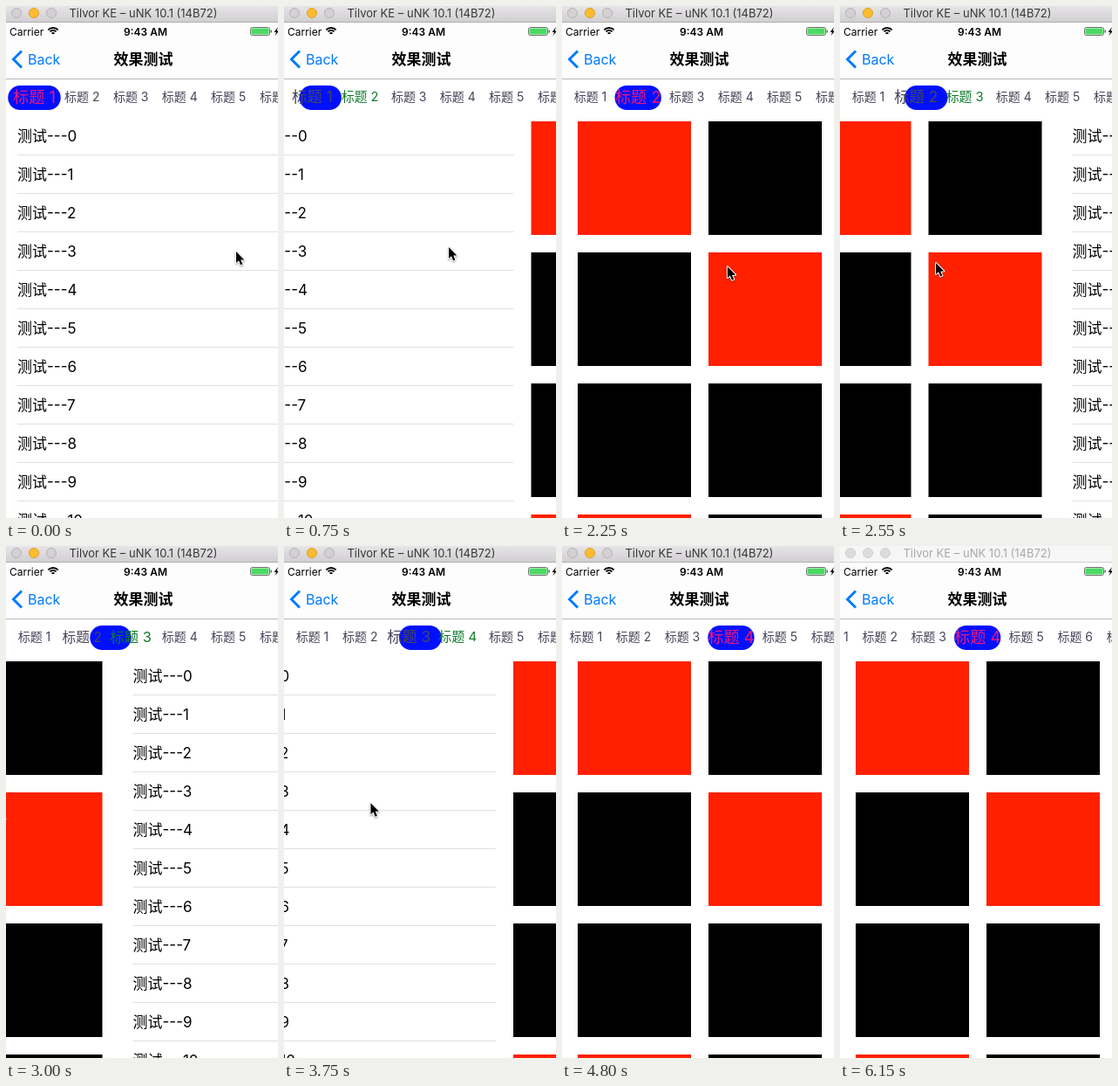
Write an HTML page with a canvas that moves like this. It is 312x586 px and loops after 6.25 s.

```html
<!DOCTYPE html>
<html lang="zh">
<head>
<meta charset="utf-8">
<style>
  html, body { margin: 0; width: 100%; height: 100%; overflow: hidden; background: #fff; }
  canvas { display: block; }
</style>
</head>
<body>
<canvas id="stage" width="312" height="586"></canvas>
<script>
const ctx = document.getElementById('stage').getContext('2d');
const LOOP = 6250, STEP = 150, PAGE = 320;
const SWIPE = 1190, LAG = 80; // page travel time, and delay behind the pointer
const FAMILY = 'Inter, "Noto Sans CJK SC", "Noto Sans CJK", sans-serif';
const RED = '#ff2000', BLUE = '#0010ff', TINT = '#007aff';
const GREY = '#46465a', GREEN = '#0f7a2c', PINK = '#e8187c';

// Pointer position at the moment each drag begins
const swipes = [
  { at: 468, x: 264, y: 281 },
  { at: 2223, x: 197, y: 299 },
  { at: 3391, x: 195, y: 299 }
];
const leave = { at: 5230, x: 60, y: 76 };

const clamp = v => Math.min(1, Math.max(0, v));
const smooth = u => u * u * (3 - 2 * u);

const scrollAt = t => swipes.reduce((sum, s) => sum + clamp((t - s.at - LAG) / SWIPE), 0);
const tabShift = t => 41.5 * smooth(clamp((t - 4700) / 450));

// The pointer comes in fast from the left, then drags back out
function pointerAt(t) {
  const time = Math.max(t, swipes[0].at);
  const spots = [...swipes, leave].map(s => {
    const dt = time - s.at;
    return { x: s.x + (dt < 0 ? dt : -.266 * dt), y: s.y - 5 * Math.sin(dt / 190) };
  });
  return spots.reduce((a, b) => b.x > a.x ? b : a);
}

function rect(x, y, w, h, color) {
  ctx.fillStyle = color;
  ctx.fillRect(x, y, w, h);
}

function text(str, x, y, size, color = '#000', align = 'left', weight = 400) {
  ctx.font = `${weight} ${size}px ${FAMILY}`;
  ctx.textAlign = align;
  ctx.fillStyle = color;
  ctx.fillText(str, x, y);
}

function pill(x, y, w, h, r) {
  ctx.beginPath();
  ctx.roundRect(x, y, w, h, r);
}

function fill(color) {
  ctx.fillStyle = color;
  ctx.fill();
}

function stroke(color, width) {
  ctx.strokeStyle = color;
  ctx.lineWidth = width;
  ctx.stroke();
}

function polygon(...points) {
  ctx.beginPath();
  points.forEach(([x, y]) => ctx.lineTo(x, y));
}

function list(x) {
  for (let i = 0; i < 11; i++) {
    text('测试---' + i, x + 15, 155 + 44 * i, 17);
    rect(x + 15, 170 + 44 * i, PAGE - 15, 1, '#e0e0e3');
  }
}

function grid(x) {
  for (let i = 0; i < 8; i++) {
    rect(x + 20 + 150 * (i % 2), 132 + 150 * (i >> 1), 130, 130, i % 3 ? '#000' : RED);
  }
}

function pages(pos) {
  for (let i = 0; i < 4; i++) {
    const x = -2 + Math.round((i - pos) * PAGE * 2) / 2;
    if (Math.abs(i - pos) < 1) (i % 2 ? grid : list)(x);
  }
}

const tabCenter = i => i ? 31.2 + 56 * i : 32.5;
const tabWidth = i => i ? 41 : 39.5;

function tabs(pos, shift) {
  const cur = Math.floor(pos), f = pos - cur;
  const scale = i => 1 + .3 * Math.max(0, 1 - Math.abs(i - pos));
  const mix = fn => fn(cur) + (fn(cur + 1) - fn(cur)) * f;
  const w = pos ? mix(i => tabWidth(i) * scale(i)) : 60.5;

  pill(mix(tabCenter) - w / 2 - shift, 91, w, 28, 14);
  fill(BLUE);

  for (let i = 0; i < 8; i++) {
    const size = 14 * scale(i);
    const color = !f && i === cur ? PINK : f && i === cur + 1 ? GREEN : GREY;
    text('标题 ' + (i + 1), tabCenter(i) - shift, 104 + .36 * size, size, color, 'center');
  }
}

function titleBar(active) {
  const shade = ctx.createLinearGradient(0, 0, 0, 18);
  shade.addColorStop(0, active ? '#e6e4e6' : '#f6f6f6');
  shade.addColorStop(1, active ? '#d1cfd1' : '#f6f6f6');
  rect(0, 0, 312, 18, shade);
  rect(0, 18, 312, 1, active ? '#b1afb1' : '#d2d2d2');
  for (let i = 0; i < 3; i++) {
    const lit = active && i === 1;
    ctx.beginPath();
    ctx.arc(12 + 20 * i, 8, 5.5, 0, 7);
    fill(lit ? '#fdbc30' : active ? '#d3d1d3' : '#dcdcdc');
    stroke(lit ? '#dc9f28' : active ? '#b4b2b4' : '#d0d0d0', 1);
  }
  text('Tilvor KE – uNK 10.1 (14B72)', 157.5, 13, 13, active ? '#383838' : '#a8a8a8', 'center');
}

function statusBar() {
  text('Carrier', 4, 33.5, 12);
  text('9:43 AM', 160, 33.5, 12, '#000', 'center', 600);

  for (let r = 2; r < 9; r += 3) {
    ctx.beginPath();
    ctx.arc(54, 33, r, -Math.PI * .75, -Math.PI * .25);
    stroke('#000', 1.8);
  }

  pill(280.5, 24.5, 22, 9, 2);
  stroke('#707070', 1);
  rect(281.5, 25.5, 20, 7, '#4cd964');
  rect(303.5, 27.5, 1.5, 3, '#707070');
  polygon([312, 24], [307.5, 30], [310, 30], [308.5, 34], [313, 28.5], [310.5, 28.5]);
  fill('#000');
}

function navBar() {
  rect(0, 19, 312, 64, '#fdfdfd');
  rect(0, 83, 312, 1, '#b8b8ba');
  polygon([18, 51.5], [8.5, 61], [18, 70.5]);
  stroke(TINT, 3);
  text('Back', 25, 67, 16, TINT);
  text('效果测试', 157.5, 67, 17, '#000', 'center', 600);
}

function pointer({ x, y }) {
  ctx.save();
  ctx.translate(x, y);
  ctx.lineJoin = 'round';
  polygon([0, 0], [0, 13], [3, 10.3], [5.2, 15.5], [7.4, 14.6], [5.2, 9.6], [9.3, 9.4]);
  ctx.closePath();
  ctx.shadowColor = 'rgba(0, 0, 0, .4)';
  ctx.shadowBlur = 2;
  ctx.shadowOffsetY = 1;
  stroke('#fff', 2);
  ctx.shadowColor = 'transparent';
  fill('#000');
  ctx.restore();
}

function draw(now) {
  const time = now % LOOP;
  const t = Math.floor(time / STEP) * STEP;
  const pos = scrollAt(t);

  rect(0, 0, 312, 586, '#fff');
  pages(pos);
  tabs(pos, tabShift(t));
  navBar();
  statusBar();
  titleBar(time < 6150);
  pointer(pointerAt(t));
  requestAnimationFrame(draw);
}
requestAnimationFrame(draw);
</script>
</body>
</html>
```
